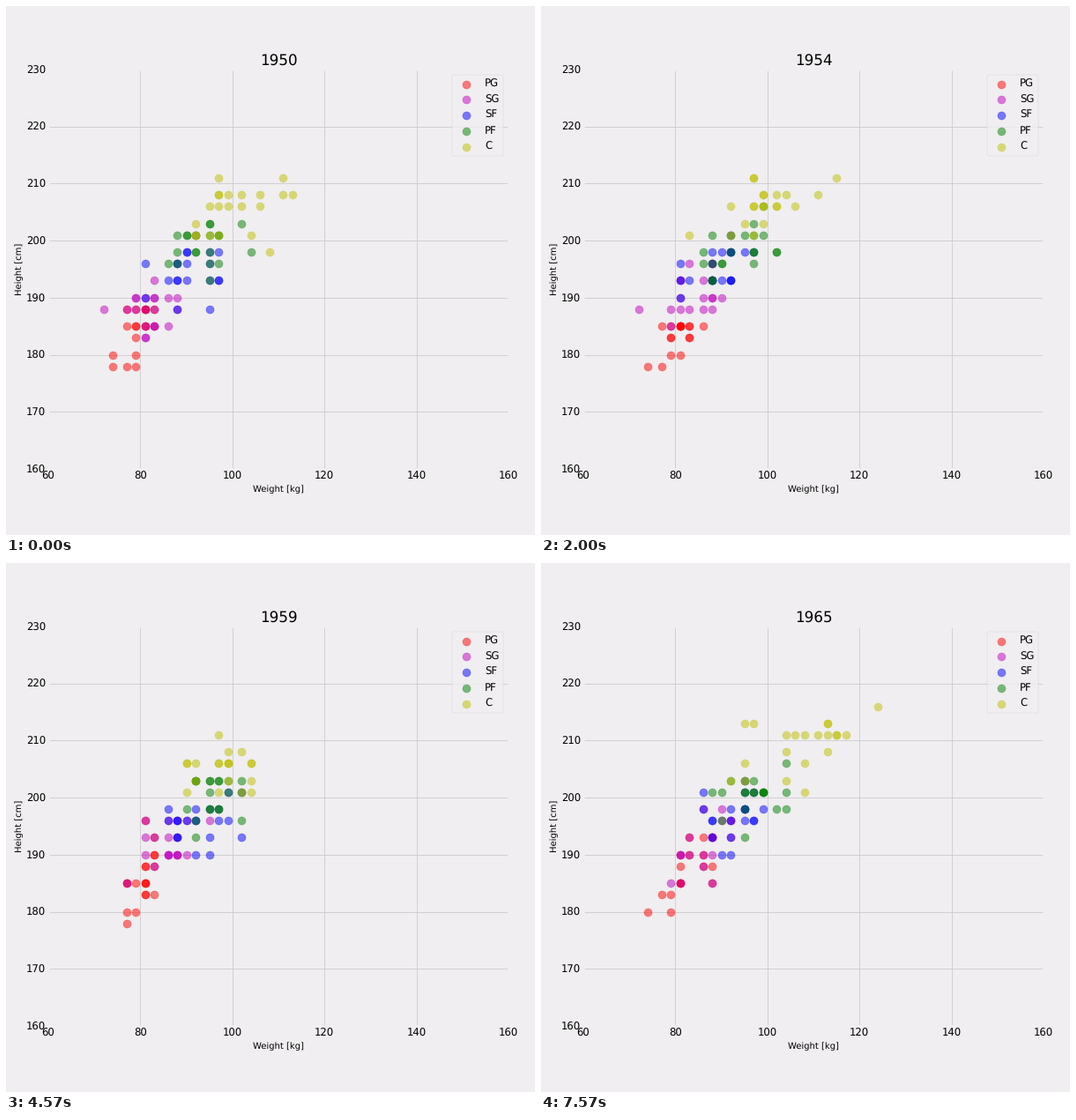
These frames come from a looping animation (600x600 px, 8 s). A matplotlib script:

```python
import random

import matplotlib.pyplot as plt
from matplotlib.animation import FuncAnimation

BG = "#f0eef0"
FIRST, LAST = 1950, 1965
FPS = 25          # two seasons per second
SWITCH = 14       # odd seasons start this many ticks into the second

# Position: color, places, mean height [in], mean weight [lb], weight range
POSITIONS = {
    "PG": ("r", 17, 72.6, 177, 12),
    "SG": ("m", 19, 74.5, 185, 18),
    "SF": ("b", 20, 76.6, 200, 24),
    "PF": ("g", 20, 78.2, 209, 22),
    "C": ("y", 20, 80.9, 221, 30),
}
TALLER, HEAVIER = 0.06, 0.5   # growth per year
LB_PER_INCH = 3

# Players at the edges of the cloud: inches, pounds, first and last season
OUTLIERS = {
    "PG": [(70, 170, 1950, 1960), (77, 180, 1958, 1961)],
    "SG": [(74, 160, 1950, 1955), (69, 160, 1952, 1953)],
    "C": [(82, 245, 1950, 1957), (85, 275, 1960, 1965),
          (87, 235, 1961, 1962)],
}


def careers(pos, rng):
    """Fill every place with one player after another."""
    _, places, height, weight, spread = POSITIONS[pos]
    players = list(OUTLIERS.get(pos, []))
    for _ in range(places):
        start = FIRST - rng.randrange(4)
        while start <= LAST:
            end = start + rng.randint(1, 5)
            age = start - FIRST
            extra = rng.triangular(-3, 3)
            inches = round(height + TALLER * age + extra)
            pounds = (weight + HEAVIER * age + LB_PER_INCH * extra
                      + rng.triangular(-spread, spread))
            players.append((inches, 5 * round(pounds / 5), start, end))
            start = end + 1
    return players


def metric(inches, pounds):
    return int(pounds * 0.4536), round(inches * 2.54 - 0.01)


rng = random.Random(23)
league = {pos: careers(pos, rng) for pos in POSITIONS}


def roster(pos, year):
    return [metric(inches, pounds)
            for inches, pounds, start, end in league[pos]
            if start <= year <= end]


plt.style.use("fivethirtyeight")
plt.rcParams.update({
    "font.family": "DejaVu Sans", "text.hinting": "no_hinting",
    "axes.edgecolor": BG, "axes.facecolor": BG,
    "figure.facecolor": BG, "savefig.facecolor": BG,
})

fig = plt.figure(figsize=(10, 10), dpi=60)
ax = fig.add_axes([0.08, 0.125, 0.87, 0.755])
ax.set(xlim=(60, 160), ylim=(160, 230))
ax.set_xlabel("Weight [kg]", fontsize=12)
ax.set_ylabel("Height [cm]", fontsize=12)
title = ax.set_title(str(FIRST))
dots = {pos: ax.scatter(*zip(*roster(pos, FIRST)), s=120, c=style[0],
                        alpha=0.5, label=pos)
        for pos, style in POSITIONS.items()}
ax.legend(loc="upper right", labelspacing=0.53)


def update(i):
    second, tick = divmod(i, FPS)
    year = FIRST + 2 * second + (tick >= SWITCH)
    title.set_text(str(year))
    for pos, dot in dots.items():
        dot.set_offsets(roster(pos, year))
    return [title, *dots.values()]


anim = FuncAnimation(fig, update, frames=8 * FPS, interval=1000 // FPS,
                     init_func=lambda: update(0), repeat=True,
                     repeat_delay=0, blit=False)
plt.show()
```
